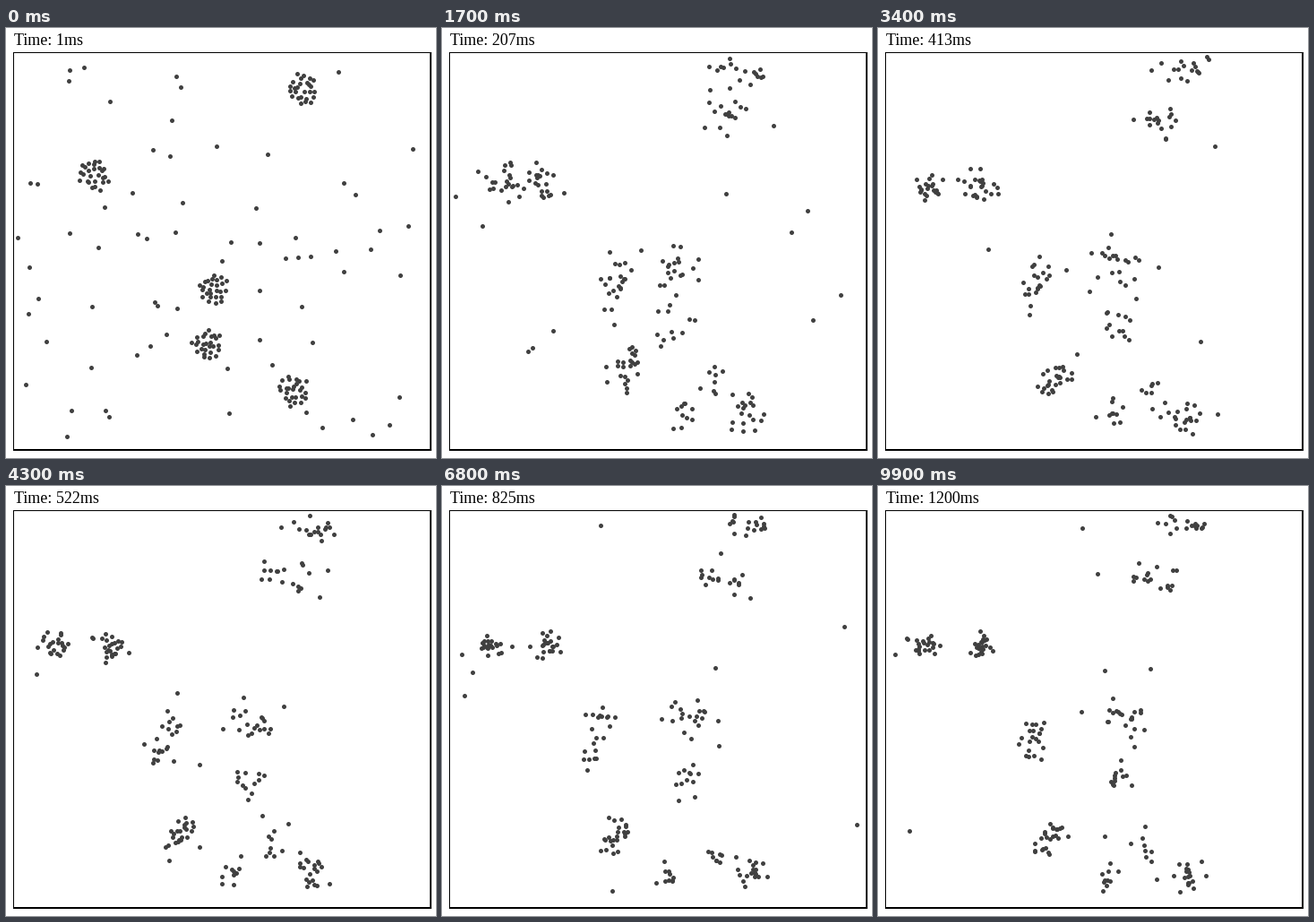
Recreate the animation shown at these times as a matplotlib script. Size 480 by 480 pixels, loop 10000 ms.

```python
import numpy as np
import matplotlib.pyplot as plt
from matplotlib.animation import FuncAnimation
from matplotlib.patches import Rectangle

SIZE, DPI, FRAMES = 480, 100, 100
PX = 72 / DPI
INK = "#404040"
LOW, HIGH = np.array([13, 32]), np.array([469, 466])
PER_DISC, DISC_R = 26, 17
LOOSE, STRAYS = 70, 7
rng = np.random.default_rng(11)

# Each opening disc breaks up into swarms that settle at these places.
HUBS = {
    (332, 69): [(355, 45), (298, 101), (326, 108), (333, 43)],
    (99, 164): [(53, 180), (116, 179)],
    (232, 292): [(178, 265), (171, 295), (264, 252), (284, 264)],
    (225, 353): [(273, 327), (200, 386), (188, 401)],
    (321, 405): [(254, 437), (342, 439), (349, 432), (302, 408)],
}
centers = np.array(list(HUBS), float)


def hub_distance(points):
    return np.linalg.norm(points[:, None] - centers[None], axis=2)


def disc(center):
    """Evenly filled disc with a little jitter."""
    k = np.arange(PER_DISC)
    r = DISC_R * np.sqrt((k + 0.5) / PER_DISC)
    a = k * 2.39996 + rng.uniform(0, 2 * np.pi)
    ring = np.column_stack([r * np.cos(a), r * np.sin(a)])
    return center + ring + rng.uniform(-2.5, 2.5, (PER_DISC, 2))


def field():
    """Loose dots outside the discs, thicker towards the floor, remotest last."""
    p = LOW + (HIGH - LOW) * rng.random((4 * LOOSE, 2)) ** [1, 0.8]
    p = p[hub_distance(p).min(axis=1) > DISC_R + 6][:LOOSE]
    return p[np.argsort(hub_distance(p).min(axis=1))]


start = np.vstack([disc(c) for c in centers] + [field()])
N = len(start)
swarm = np.arange(N) < N - STRAYS

# Every dot joins the nearest hub; its swarms share the dots in turn.
nearest = hub_distance(start).argmin(axis=1)
hub = centers[nearest]
nest = np.empty((N, 2))
for h, places in enumerate(HUBS.values()):
    members = np.flatnonzero(nearest == h)
    nest[members] = [places[k % len(places)] for k in range(len(members))]

arrive = np.clip(6 + np.linalg.norm(hub - start, axis=1) / 30, 7, 11)

# Dots swing on their own ellipses; a few reach far out as a halo.
halo = np.where(rng.random(N) < 0.14, 2.1, 0.95)[:, None]
reach = 7.5 * halo * rng.rayleigh(1, (N, 2))
omega = rng.uniform(0.25, 0.7, (N, 1)) * rng.choice([-1, 1], (N, 1))
phase = rng.uniform(0, 2 * np.pi, (N, 2))

# Strays fly straight and bounce off the walls.
heading = rng.uniform(0, 2 * np.pi, N)
speed = rng.uniform(4, 9, (N, 1))
velocity = speed * np.column_stack([np.cos(heading), np.sin(heading)])


def bounce(p):
    span = HIGH - LOW
    m = (p - LOW) % (2 * span)
    return LOW + np.minimum(m, 2 * span - m)


def positions(i):
    settle = 1 - np.exp(-i / 15)
    spread = 1 + 1.4 * np.exp(-i / 18)
    drift = hub + (nest - hub) * settle
    orbit = drift + spread * reach * np.cos(omega * i + phase)
    u = np.clip(i / arrive, 0, 1)
    ease = (u * u * (3 - 2 * u))[:, None]
    p = np.where(swarm[:, None], start + (orbit - start) * ease, start + velocity * i)
    return np.floor(bounce(p)) + 0.5


fig = plt.figure(figsize=(SIZE / DPI, SIZE / DPI), dpi=DPI, facecolor="white")
ax = fig.add_axes([0, 0, 1, 1])
ax.set_xlim(0, SIZE)
ax.set_ylim(SIZE, 0)
ax.axis("off")

# The frame is one pixel thick at the top and left, two at the bottom and right.
ax.add_patch(Rectangle((8, 27), 467, 445, fc="black", lw=0))
ax.add_patch(Rectangle((9, 28), 464, 442, fc="white", lw=0))
dots = ax.scatter(*start.T, s=np.full(N, (5 * PX) ** 2), c=INK, linewidths=0, zorder=3)
label = ax.text(9, 19, "", fontfamily="Liberation Serif", fontsize=18 * PX,
                color="black", va="baseline")


def draw(i):
    dots.set_offsets(positions(i))
    label.set_text(f"Time: {round(1 + 1199 * i / (FRAMES - 1))}ms")
    return dots, label


anim = FuncAnimation(fig, draw, frames=FRAMES, interval=100, repeat=True,
                     repeat_delay=0, blit=False)
plt.show()
```
